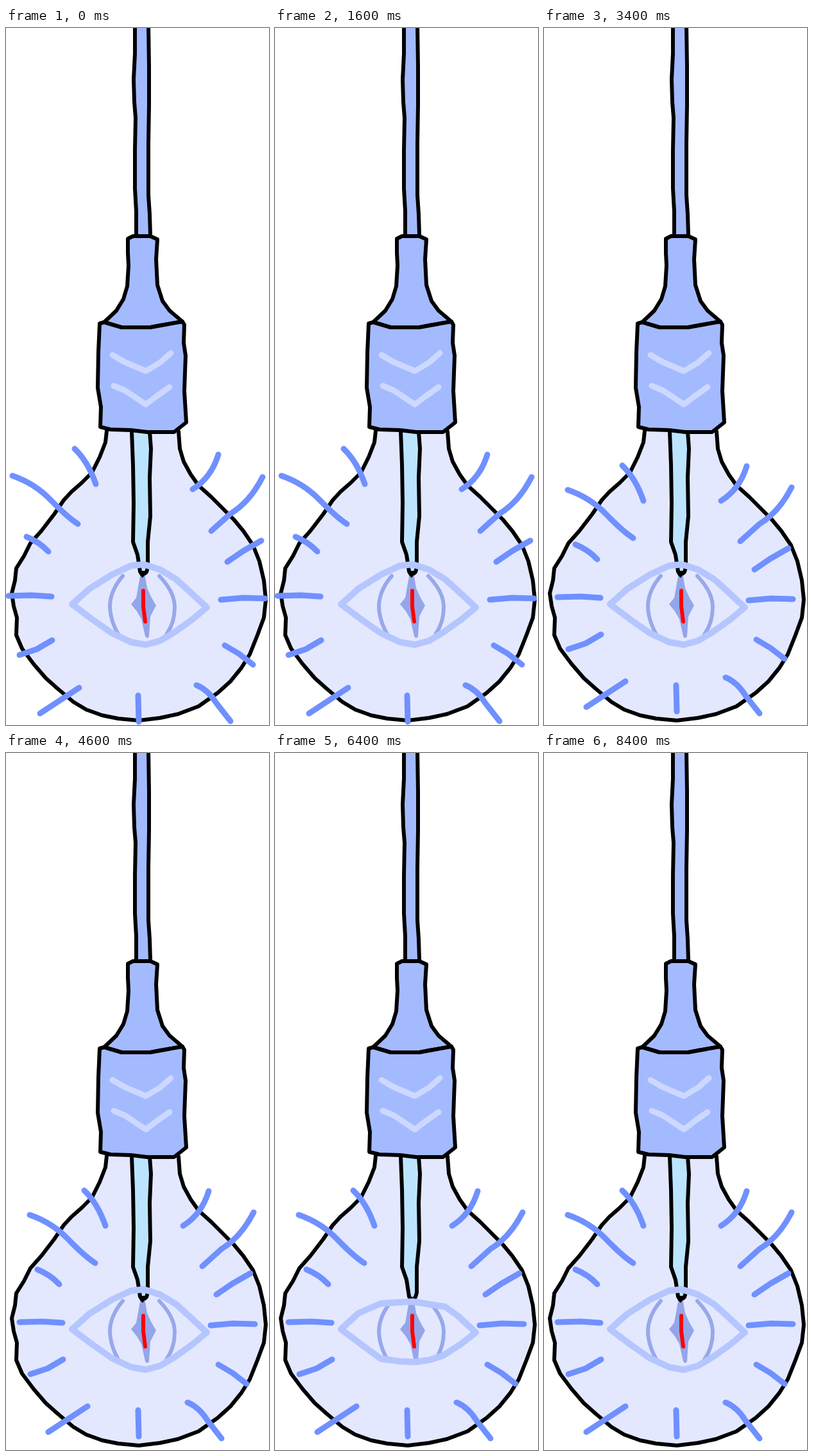
Write an HTML page that moves like this. It is 410x1085 px and loops after 8.6 s.

```html
<!DOCTYPE html>
<html lang="en">
<head>
<meta charset="utf-8">
<title>Light bulb eye</title>
<style>
  html, body { margin: 0; width: 100%; height: 100%; overflow: hidden; background: #fff; }
  svg { display: block; width: 100%; height: 100%; }
  path { fill: none; stroke-linecap: round; stroke-linejoin: round; }
  .ink { stroke: #000; stroke-width: 6; }
  .blue { fill: #a4baff; }
  .chevron { stroke: #ccd8ff; stroke-width: 9; }
  .iris { stroke: #98a8ea; stroke-width: 6; }
  #lid { stroke: #b5c6ff; stroke-width: 10; }
  #rays { stroke: #7090ff; stroke-width: 9; }
</style>
</head>
<body>
<svg viewBox="0 0 410 1085">
  <clipPath id="opening"><path id="hole"/></clipPath>

  <path id="bulb" class="ink" d="M157 627L155 645 146 668 134 692 118 708 102 722 90 735 75 757 55 783 38 802 28 822 16 841 14 860 9 880 12 900 17 918 16 945 25 966 43 990 62 1012 80 1028 105 1049 125 1061 150 1070 175 1075 207 1078 240 1074 268 1068 300 1056 330 1035 350 1017 367 996 380 975 392 945 402 918 405 890 402 860 395 830 385 805 370 783 355 765 338 748 320 730 300 712 288 695 277 675 271 655 269 628"/>

  <path fill="#fff" style="fill:#bde4ff" d="M196 628L199 740 198 800 208 848H221V800L225 760 224 628Z"/>
  <path class="ink" d="M196 628L198 680 199 740 198 800 205 820 209 846 213 852 219 847 221 840 221 800 225 760 224 700 226 655 224 628"/>

  <path class="blue" d="M201 0L199 80 202 140 201 250 203 324H225L222 260 223 120 222 0Z"/>
  <path class="ink" d="M201 -5V40L199 80 200 115 202 140 201 190 201 250 203 285 203 322M222 -5L223 60 223 120 222 180 222 260 224 290 225 322"/>
  <path class="ink blue" d="M190 328L198 324 225 324 236 329 234 360 236 400 244 425 255 440 275 457 240 463 225 466 180 466 153 458 172 440 183 422 189 402 191 370 190 350Z"/>
  <path class="ink blue" d="M146 460L153 458 180 466 225 466 275 457 278 462 277 490 280 510 278 565 281 614 262 629 220 629 195 626 163 625 147 621 148 590 143 560 144 505Z"/>
  <path class="chevron" d="M166 509L185 520 218 534 240 521 257 506M168 557L185 564 218 586 235 573 255 559"/>

  <g clip-path="url(#opening)">
    <path class="iris" d="M182 853Q163 875 162 899 162 923 178 949M239 853Q263 878 263 901 263 926 250 944"/>
    <path style="fill:#94a5e9" d="M210 848H216L220 872 227 887 234 899 225 916 223 947Q220 952 217 947L211 920 204 908 195 897 203 887Z"/>
  </g>
  <path d="M206 845H219L217 851 213 856 209 852Z" id="nib" style="fill:#000"/>
  <path id="lid"/>
  <path d="M214 876L214 900 217 924" stroke="#f00" stroke-width="6"/>
  <g id="rays"></g>
</svg>
<script>
const $ = id => document.getElementById(id);
const LOOP = 8600, STEP = 200, DARK = 29, MID = 899;

// Each ray: its outer path and how far it shifts inward.
const rays = [
  ['M107 655Q128 675 140 710', 15, 26],
  ['M10 697Q45 709 70 735T112 772', 27, 22],
  ['M32 792Q52 800 66 815', 17, 12],
  ['M4 884L40 883 71 885', 17, 2],
  ['M21 976L48 967 72 953', 17, -9],
  ['M53 1067L85 1046 114 1027', 13, -10],
  ['M206 1039L207 1080', 0, -16],
  ['M297 1023Q315 1030 328 1051L350 1079', -14, -12],
  ['M341 961L363 974 385 991', -10, -9],
  ['M335 890L370 887 404 888', -16, 1],
  ['M345 831L370 814 398 798', -17, 12],
  ['M320 783L350 756Q380 738 400 699', -14, 16],
  ['M291 718Q320 700 331 664', -15, 18]
].map(([d, dx, dy]) => {
  const el = document.createElementNS('http://www.w3.org/2000/svg', 'path');
  el.setAttribute('d', d);
  $('rays').append(el);
  return { el, dx, dy };
});

// Lid points: x, y when wide open, y when drooping.
const lid = [
  [103, 897, 897], [130, 873, 872], [165, 851, 857], [195, 837, 855],
  [215, 835, 854], [240, 843, 858], [265, 858, 862], [285, 876, 876],
  [313, 902, 902], [290, 921, 920], [262, 941, 938], [240, 954, 945],
  [218, 960, 948], [195, 956, 947], [165, 942, 943], [135, 921, 921]
];

function lidPath(n) {
  const away = Math.abs(n - DARK);
  const droop = away / 3;
  return 'M' + lid.map(([x, open, low]) =>
    `${x} ${away > 3 ? open : MID + (low - MID) * droop}`).join('L') + 'Z';
}

function draw(now) {
  const n = Math.floor(now % LOOP / STEP);
  const dark = n === DARK;
  const inward = n < DARK ? n % 2 : 1 - n % 2;
  const d = lidPath(n);
  $('lid').setAttribute('d', d);
  $('hole').setAttribute('d', d);
  $('nib').style.display = Math.abs(n - DARK) > 3 ? '' : 'none';
  $('bulb').style.fill = dark ? '#d3d7ea' : '#e3e8ff';
  $('rays').style.display = dark ? 'none' : '';
  for (const { el, dx, dy } of rays)
    el.setAttribute('transform', `translate(${dx * inward} ${dy * inward})`);
}

const start = performance.now();
function tick() {
  draw(performance.now() - start);
  requestAnimationFrame(tick);
}
tick();
</script>
</body>
</html>
```
